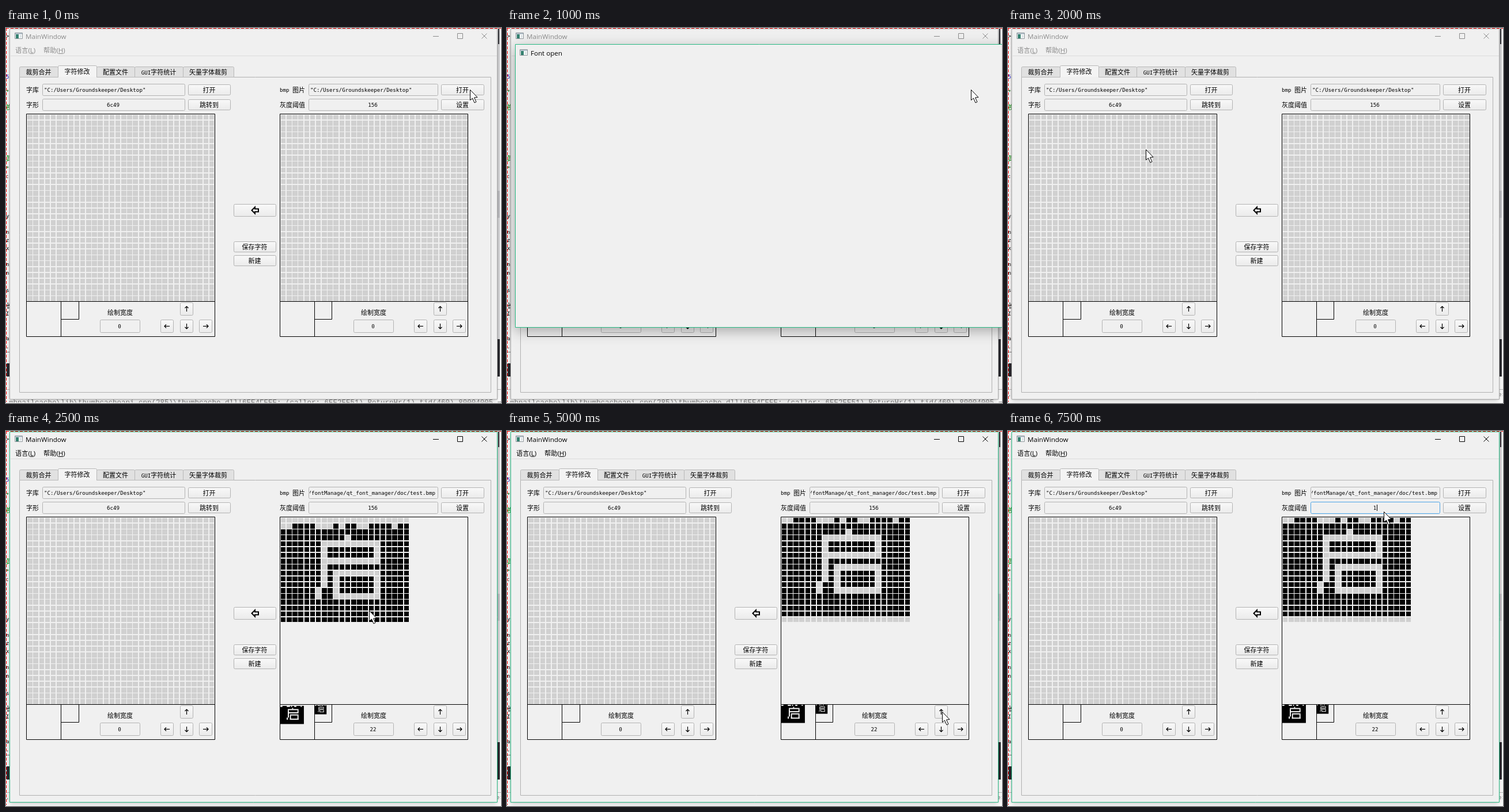
Write an HTML page with a canvas that moves like this. It is 859 by 652 pixels and loops after 8000 ms.

```html
<!DOCTYPE html>
<html lang="zh">
<head>
<meta charset="utf-8">
<title>MainWindow</title>
<style>
html, body { margin: 0; width: 100%; height: 100%; overflow: hidden; background: #fff; }
canvas { display: block; }
</style>
</head>
<body>
<canvas id="stage" width="859" height="652"></canvas>
<script>
const g = document.getElementById('stage').getContext('2d');
const LOOP = 8000, STEP = 500;
const BG = '#f0f0f0', GREEN = '#27b983', BLUE = '#0078d7', CELL = '#d0d0d0';
const PITCH = 10.18, CELL_SIZE = 8.5;
const HAN_FONT = "'Noto Sans CJK SC', 'Noto Sans CJK', sans-serif";
const SONG = { latin: "9.17px 'DejaVu Sans Mono', monospace", han: '11px ' + HAN_FONT };
const UI = { latin: "11.6px 'Open Sans', sans-serif", han: '11.2px ' + HAN_FONT };

// Pointer position for every half second.
const POINTER = [[805, 107], [805, 107], [805, 107], [253, 217], [239, 211], [630, 312],
  [699, 319], [729, 393], [760, 519], [755, 488], [755, 488], [649, 158], [652, 140]];

// Light strokes of the glyph as x, y, width, height in cells.
const STROKES = [[0, 0, 2, 1], [6, 0, 3, 1], [10, 0, 1, 1], [13, 0, 2, 1], [19, 0, 1, 1],
  [11, 2, 1, 1], [7, 3, 10, 1], [7, 4, 1, 7], [16, 4, 1, 2], [7, 6, 10, 1], [6, 11, 1, 2],
  [9, 8, 8, 1], [9, 9, 1, 4], [16, 9, 1, 4], [9, 12, 8, 1]];

function fill(x, y, w, h, color) {
  g.fillStyle = color;
  g.fillRect(x, y, w, h);
}

function box(x, y, w, h, line, back, r = 0) {
  g.beginPath();
  g.roundRect(x + .5, y + .5, w, h, r);
  if (back) { g.fillStyle = back; g.fill(); }
  if (line) { g.strokeStyle = line; g.lineWidth = 1; g.stroke(); }
}

function path(points, { line, back, width = 1, close = false }) {
  g.beginPath();
  points.forEach(([x, y]) => g.lineTo(x, y));
  if (close) g.closePath();
  if (back) { g.fillStyle = back; g.fill(); }
  if (line) { g.strokeStyle = line; g.lineWidth = width; g.stroke(); }
}

function disc(x, y, r, color) {
  g.beginPath();
  g.arc(x, y, r, 0, 7);
  g.fillStyle = color;
  g.fill();
}

function clipped(x, y, w, h, draw) {
  g.save();
  g.beginPath();
  g.rect(x, y, w, h);
  g.clip();
  draw();
  g.restore();
}

// Splits a string into Latin and Han runs, each with its own font.
function runs(s, font) {
  return (s.match(/[\u2e80-\u9fff]+|[^\u2e80-\u9fff]+/g) || []).map(part => {
    const face = part.charCodeAt(0) < 0x2e80 ? font.latin : font.han;
    g.font = face;
    return { part, face, width: g.measureText(part).width };
  });
}
const widthOf = (s, font) => runs(s, font).reduce((sum, r) => sum + r.width, 0);

// y is the middle of the line; "&" underlines the next letter.
function text(s, x, y, { font = SONG, align = 0, color = '#000' } = {}) {
  const key = s.indexOf('&');
  s = s.replace('&', '');
  x -= widthOf(s, font) * align;
  g.fillStyle = color;
  if (key >= 0) {
    const from = x + widthOf(s.slice(0, key), font);
    g.fillRect(from, y + 5, widthOf(s[key], font), 1);
  }
  for (const r of runs(s, font)) {
    g.font = r.face;
    g.fillText(r.part, x, y + (r.face === SONG.latin ? 3.5 : 4));
    x += r.width;
  }
}
const ui = (s, x, y, color = '#000', align = 0) => text(s, x, y, { font: UI, color, align });

function button(x, y, w, h, label) {
  const shade = g.createLinearGradient(0, y, 0, y + h);
  shade.addColorStop(0, '#f9f9f9');
  shade.addColorStop(1, '#ebebeb');
  box(x, y, w, h, '#b3b3b3', shade, 2);
  if (label) text(label, x + w / 2, y + h / 2 + .5, { align: .5 });
}

function field(x, y, w, h, label, align = .5, line = '#b3b3b3') {
  box(x, y, w, h, line, BG, 2);
  const at = x + 3 + (w - 7) * align;
  clipped(x + 2, y, w - 3, h, () => text(label, at, y + h / 2, { align }));
}

function arrow(x, y, angle, color = '#000', size = 4) {
  g.save();
  g.translate(x, y);
  g.rotate(angle);
  path([[-size - .5, 0], [size + .5, 0]], { line: color, width: 1.2 });
  path([[size - 2.5, -3], [size + .5, 0], [size - 2.5, 3]], { line: color, width: 1.2 });
  g.restore();
}

function chevron(x, y, dir, color = '#444') {
  path([[x - 4, y - 2 * dir], [x, y + 2 * dir], [x + 4, y - 2 * dir]], { line: color, width: 1.3 });
}

const triangle = (x, y) =>
  path([[x - 4, y - 2], [x + 4, y - 2], [x, y + 2]], { back: '#1e395b', close: true });

function cells(ox, oy, cols, rows, color) {
  for (let r = 0; r < rows; r++) for (let c = 0; c < cols; c++) {
    const x = ox + c * PITCH, y = oy + r * PITCH;
    const left = Math.round(x), top = Math.round(y);
    fill(left, top, Math.round(x + CELL_SIZE) - left, Math.round(y + CELL_SIZE) - top, color(c, r));
  }
}

function glyphColor(c, r, shift) {
  const y = r - shift;
  const light = y < 0 || y > 16 ||
    STROKES.some(([sx, sy, w, h]) => c >= sx && c < sx + w && y >= sy && y < sy + h);
  return light ? CELL : '#000';
}

function thumb(x, y, unit, shift) {
  fill(x, y + shift * unit, 22 * unit, 17 * unit, '#000');
  STROKES.forEach(([sx, sy, w, h]) =>
    fill(x + sx * unit, y + (sy + shift) * unit, w * unit, h * unit, '#fff'));
}

function appIcon(x, y) {
  box(x, y, 13, 10, '#8c9499', '#fff');
  fill(x + 1, y + 1, 12, 2, '#b9c6d0');
  fill(x + 2, y + 3, 5, 7, '#35806f');
  fill(x + 9, y + 4, 3, 5, '#dfe5e8');
}

function backdrop(step) {
  fill(0, 0, 859, 652, '#fff');
  const code = [[13, '>,'], [84, '5,', '#22c'], [110, '**', '#060'], [138, '换', '#080'],
    [227, '其', '#080'], [243, '**', '#060'], [257, ':1'], [285, ' 0', '#22c'], [299, ' 0', '#22c'],
    [313, ' 0', '#22c'], [326, 'ye'], [340, ' 0', '#22c'], [354, 'n'], [368, 'ze'], [382, 'xl'],
    [410, 'nl'], [425, 'nS'], [455, 'sB'], [483, '长'], [496, 'II'], [539, 'an'], [553, '.B']];
  code.forEach(([y, s, color]) => text(s, 0, y, { color }));
  fill(1, 563, 6, 1, '#777');
  fill(1, 583, 6, 23, '#2b2b30');
  fill(1, 628, 6, 1, '#bbb');
  fill(853, 1, 4, 540, '#d8d8da');
  fill(854, 1, 2, 27, '#2b2b30');
  fill(853, 283, 4, 47, '#c0c0c4');
  fill(853, 541, 4, 65, '#2b2b30');
  fill(853, 628, 6, 1, '#bbb');
  if (step > 3) {
    text(',D', 0, 636, { color: '#777' });
    text('e:', 851, 636, { color: '#777' });
  }
  const log = step < 3
    ? 'mbnailcache\\lib\\thumbcacheapi.cpp(285)\\thumbcache.dll!6EE4FEEE: (caller: 6EE2EE51) ReturnHr(1) tid(460) 80004005 \u4e00'
    : step < 4 ? '\\..Managed' : '';
  clipped(0, 646, 859, 5, () => {
    g.font = "12.5px 'Liberation Mono', monospace";
    g.fillStyle = '#808080';
    g.fillText(log, 5, 655);
  });
}

function shadowBox(x, y, w, h, line, blur, drop) {
  g.save();
  g.shadowColor = 'rgba(0,0,0,.3)';
  g.shadowBlur = blur;
  g.shadowOffsetY = drop;
  fill(x, y, w, h, BG);
  g.restore();
  box(x, y, w, h, line);
}

function panel(x, loaded, shift) {
  const left = Math.floor(x), mid = Math.floor(x + 60.2);
  const small = Math.floor(x + 90.7), right = Math.floor(x + 326.7);
  if (loaded) {
    cells(x + 1.85, 150.9, 22, 18, (c, r) => glyphColor(c, r, shift));
    thumb(left + 1, 476, 1.86, shift);
    thumb(mid + 1, 476, .92, shift);
  } else {
    cells(x + 1.85, 150.9, 32, 32, () => CELL);
  }
  box(left, 149, right - left, 387, '#000');
  fill(left, 475, right - left + 1, 1, '#000');
  fill(mid, 475, 1, 62, '#000');
  box(mid, 475, small - mid, 31, '#000');
  text('绘制宽度', left + 163, 495, { align: .5 });
  field(left + 128, 507, 69, 22, loaded ? '22' : '0');
  const pads = [[267, 477, -.5], [233, 507, 1], [267, 507, .5], [300, 507, 0]];
  for (const [dx, y, turn] of pads) {
    button(left + dx, y, 22, 22);
    arrow(left + dx + 11.5, y + 11.5, turn * Math.PI);
  }
}

function mainWindow(step) {
  const active = step === 1 || step >= 5, loaded = step >= 5;
  const ink = active ? '#000' : '#8a8a8a';
  shadowBox(6, 1, 846, 644, active ? GREEN : '#a8a8a8', 8, 2);
  appIcon(15, 8);
  ui('MainWindow', 34, 14.5, ink);
  fill(741, 14, 10, 1, ink);
  box(783, 9, 9, 9, ink);
  path([[825.5, 9.5], [834.5, 18.5]], { line: ink });
  path([[834.5, 9.5], [825.5, 18.5]], { line: ink });
  ui('语言(&L)', 16, 39, ink);
  ui('帮助(&H)', 65, 39, ink);
  fill(8, 48, 844, 1, '#dcdcdc');

  box(23, 85, 818, 548, '#b0b0b0');
  const tabs = [['裁剪合并', 23, 90], ['字符修改', 90, 157], ['配置文件', 157, 223],
    ['GUI字符统计', 223, 307], ['矢量字体裁剪', 307, 395]];
  tabs.forEach(([label, from, to], i) => {
    const on = i === 1;
    box(from, on ? 65 : 67, to - from, on ? 20 : 18, '#b8b8b8', on ? '#f4f4f4' : '#e1e1e1', [2, 2, 0, 0]);
    if (on) fill(from + 1, 85, to - from - 1, 2, BG);
    text(label, (from + to) / 2, on ? 76 : 77, { align: .5 });
  });

  const home = '"C:/Users/Groundskeeper/Desktop"';
  text('字库', 35, 107.5);
  text('字形', 35, 133.5);
  field(63, 97, 247, 20, home, 0);
  field(63, 123, 247, 20, '6c49');
  button(316, 98, 73, 18, '打开');
  button(316, 124, 73, 18, '跳转到');
  text('bmp 图片', 475, 107.5);
  text('灰度阈值', 475, 133.5);
  if (loaded) field(525, 97, 224, 20, '/fontManage/qt_font_manager/doc/test.bmp', 1);
  else field(525, 97, 224, 20, home, 0);
  field(525, 123, 224, 20, step >= 15 ? '1' : '156', .5, step >= 13 ? '#4aa3e6' : undefined);
  if (step === 13) fill(645, 128, 1, 11, '#000');
  if (step === 15) fill(640, 128, 1, 11, '#000');
  button(755, 98, 74, 18, '打开');
  button(755, 124, 74, 18, '设置');

  panel(35.4, false, 0);
  panel(475, loaded, step < 10 ? 1 : 0);
  button(395, 306, 73, 21);
  path([[426.5, 317], [432, 311.5], [432, 314.5], [438, 314.5], [438, 319.5], [432, 319.5], [432, 322.5]],
    { line: '#000', width: 2, close: true });
  button(395, 371, 73, 18, '保存字符');
  button(395, 395, 73, 18, '新建');
}

function folder(x, y) {
  fill(x, y - 7, 12, 14, '#f7d774');
  fill(x + 9, y - 4, 3, 11, '#e9c04f');
}

const ICONS = {
  folder,
  pc(x, y) { box(x, y - 7, 14, 10, '#3c7fa8', '#43b4ea'); fill(x + 3, y + 5, 9, 2, '#6f8b9b'); },
  video(x, y) { fill(x, y - 7, 13, 14, '#333'); fill(x + 3, y - 5, 7, 4, '#5ea0d8'); fill(x + 3, y + 1, 7, 4, '#a77c4e'); },
  image(x, y) { box(x, y - 5, 13, 9, '#888', '#fff'); fill(x + 2, y - 3, 10, 4, '#8fc0ea'); fill(x + 2, y + 1, 10, 2, '#41617c'); },
  file(x, y) { box(x + 1, y - 7, 10, 13, '#888', '#fff'); [-3, 0, 3].forEach(d => fill(x + 3, y + d, 7, 1, '#3c8fd0')); },
  down(x, y) {
    path([[x + 4, y - 7], [x + 9, y - 7], [x + 9, y], [x + 13, y], [x + 6.5, y + 7], [x, y], [x + 4, y]],
      { back: '#2f86d6', close: true });
  },
  music(x, y) { disc(x + 4, y + 4, 3, '#1b8fe6'); path([[x + 6, y + 4], [x + 6, y - 7], [x + 11, y - 1]], { line: '#1b8fe6', width: 2 }); },
  desk(x, y) { box(x, y - 5, 14, 10, '#1467a8', '#12a0f0'); },
  cloud(x, y) { disc(x + 7, y, 6, '#0f6cc8'); },
  disk(x, y) { disc(x + 7, y, 6, '#4a86f0'); }
};

function sidebar() {
  fill(15, 430, 128, 17, '#d0d0d0');
  const items = [['folder', 'Groundskeeper', 130], ['folder', '5vStartpad', 152], ['folder', 'doc', 174.5],
    ['folder', '松岚云', 197], ['folder', '音视频面试题', 219], ['cloud', 'FernNook', 248.5, 1],
    ['disk', 'QVT网盘', 278, 1], ['pc', '此电脑', 308, 1], ['video', '视频', 330], ['image', '图片', 352],
    ['file', '文档', 374], ['down', '下载', 396.5], ['music', '音乐', 418.5], ['desk', '桌面', 440.5]];
  clipped(15, 120, 128, 327, () => items.forEach(([icon, label, y, top]) => {
    ICONS[icon](top ? 37 : 45, Math.round(y));
    clipped(0, y - 10, icon === 'folder' && y < 140 ? 129 : 143, 20, () => ui(label, top ? 56 : 64, y));
  }));
  path([[132, 134], [135, 131], [133, 129], [138, 126], [140, 129], [137, 133], [135, 131]],
    { line: '#7d8790', width: 1.3 });
  fill(144, 175, 14, 106, '#c1c1c1');
  chevron(151, 128, -1);
  chevron(151, 439, 1);
}

function dialogContent() {
  arrow(33, 72.5, Math.PI, '#c4c4c4', 5);
  arrow(60, 72.5, 0, '#c4c4c4', 5);
  path([[79, 71], [82, 74], [85, 71]], { line: '#c4c4c4' });
  arrow(101, 72.5, -Math.PI / 2, '#444', 5);
  box(113, 62, 566, 20, '#d4d4d4');
  fill(660, 63, 1, 19, '#d4d4d4');
  folder(117, 72);
  const crumbs = [['此电脑', 151], ['桌面', 208], ['fontManage', 253], ['qt_font_manager', 342], ['doc', 455]];
  crumbs.forEach(([label, x]) => ui(label, x, 72));
  [139, 196, 241, 331, 443].forEach(x =>
    path([[x - 1, 69.5], [x + 2, 72.5], [x - 1, 75.5]], { line: '#555' }));
  chevron(651, 73, 1);
  g.beginPath();
  g.arc(670, 73, 4, -.6, 4.8);
  g.strokeStyle = '#555';
  g.lineWidth = 1.4;
  g.stroke();
  path([[670, 66], [674, 69], [670, 72]], { back: '#555', close: true });
  box(690, 62, 180, 20, '#d4d4d4');
  ui('搜索"doc"', 699, 72.5, '#666');

  ui('组织', 31, 104, '#1e395b');
  triangle(62, 104);
  ui('新建文件夹', 94, 104, '#1e395b');
  ICONS.image(776, 104);
  triangle(803, 104);
  box(827, 98, 13, 10, '#44708f', '#fff');
  fill(835, 99, 5, 9, '#2f86d6');
  fill(15, 119, 844, 1, '#e2e2e2');
  sidebar();

  const red = g.createLinearGradient(0, 195, 0, 213);
  red.addColorStop(0, '#d9401c');
  red.addColorStop(1, '#8c0d06');
  fill(213, 195, 21, 18, red);
  ui('启', 223.5, 204, '#ffe2a0', .5);
  ui('test.bmp', 224, 224, '#000', .5);

  ui('文件名(&N):', 188, 469, '#000', 1);
  box(193, 457, 494, 23, BLUE, '#f3f3f3');
  fill(196, 461, 1, 16, '#000');
  chevron(679, 469, 1);
  box(699, 457, 180, 22, '#adadad', '#e1e1e1');
  ui('bmp (*.bmp)', 703, 469);
  box(700, 487, 78, 21, BLUE, '#e1e1e1');
  box(701, 488, 76, 19, BLUE);
  ui('打开(&O)', 739, 498, '#000', .5);
  box(792, 487, 80, 21, '#adadad', '#e1e1e1');
  ui('取消', 832, 498, '#000', .5);
}

function dialog(full) {
  shadowBox(14, 28, 860, 492, GREEN, 22, 7);
  appIcon(22, 37);
  ui('Font open', 41, 43.5);
  if (full) dialogContent();
}

function pointer([x, y]) {
  const shape = [[0, 0], [0, 18], [4, 14.5], [7.5, 22.5], [10.5, 21], [7, 13.5], [12.5, 13]];
  path(shape.map(([dx, dy]) => [x + dx + .5, y + dy + .5]), { line: '#000', back: '#fff', close: true });
}

function recordFrame() {
  g.setLineDash([5, 3]);
  path([[0, .5], [859, .5]], { line: '#f00' });
  path([[.5, 0], [.5, 650]], { line: '#f00' });
  g.setLineDash([]);
}

function draw(now) {
  const step = Math.floor(now % LOOP / STEP);
  backdrop(step);
  mainWindow(step);
  if (step === 2 || step === 3) dialog(step === 3);
  recordFrame();
  pointer(POINTER[Math.min(step, POINTER.length - 1)]);
  requestAnimationFrame(draw);
}
requestAnimationFrame(draw);
</script>
</body>
</html>
```
